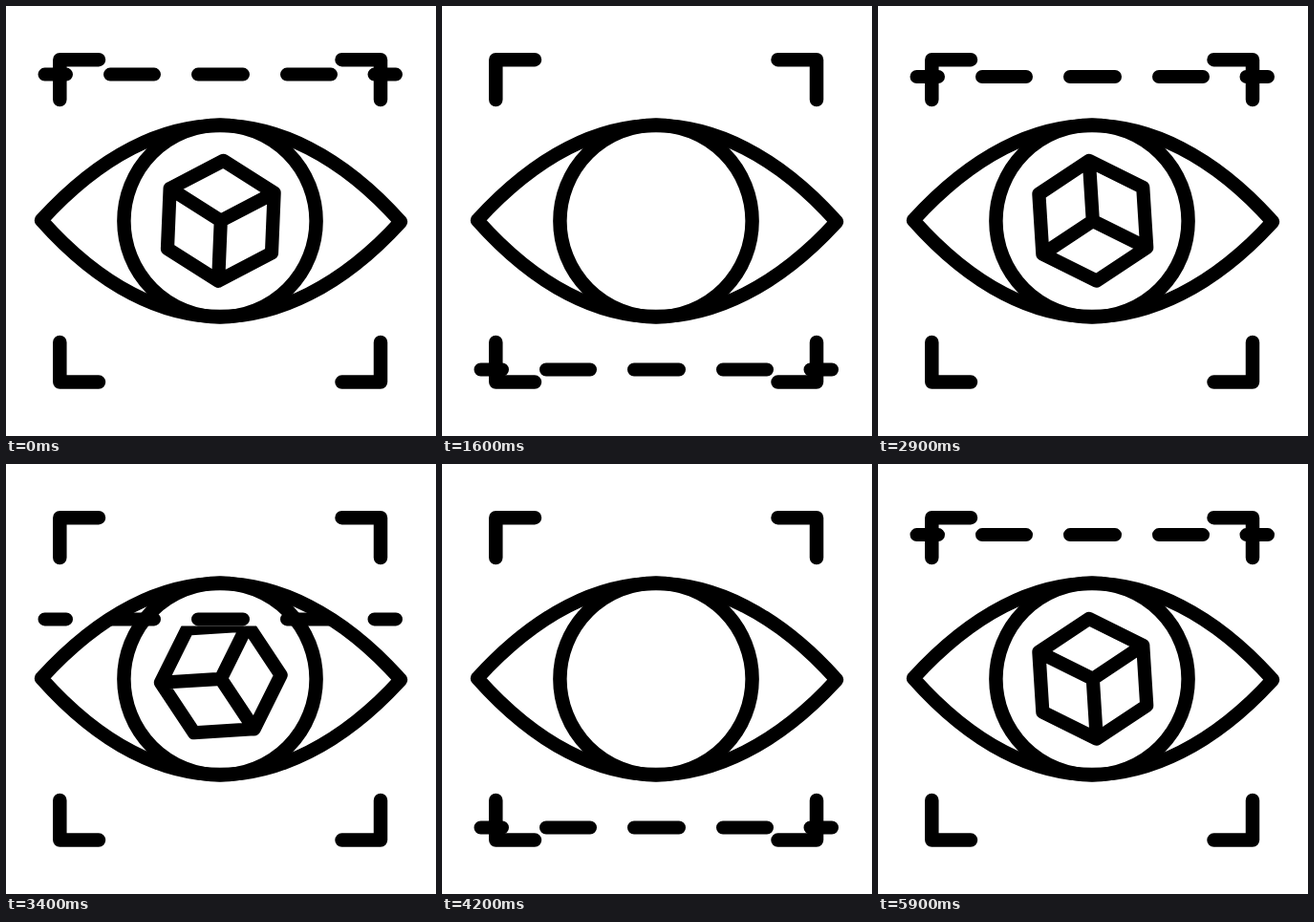
Recreate the animation shown at these times as an HTML page. Size 450x450 px, loop 6000 ms.

```html
<!DOCTYPE html>
<html lang="en">
<head>
<meta charset="utf-8">
<title>Eye scan</title>
<style>
  html, body { margin: 0; width: 100%; height: 100%; overflow: hidden; background: #fff; }
  svg { display: block; width: 100vw; height: 100vh; }
  .ink { fill: none; stroke: #000; stroke-width: 14.5; stroke-linecap: round; stroke-linejoin: round; }
</style>
</head>
<body>
<svg viewBox="0 0 450 450">
  <defs>
    <clipPath id="below"><rect id="window" width="450" height="450"/></clipPath>
  </defs>
  <g class="ink">
    <path d="M97 56.2H56.3V98M351.5 56.2H392V98M56.3 352V393.6H97M392 352V393.6H351.5"/>
    <path d="M37 224.2C100 155 165 125 224 125S350 155 413 225.8C350 295 283 325 224 325S100 295 37 224.2Z"/>
    <circle cx="224" cy="225" r="100.6"/>
    <g clip-path="url(#below)">
      <path id="cube" stroke-width="14.2"/>
    </g>
    <path id="beam" stroke-width="14" d="M40.5 0H63M109 0H155M201 0H248M294 0H340M385.5 0H408"/>
  </g>
</svg>
<script>
  const LOOP = 6000, STEP = 100;
  const TOP = 71, BOTTOM = 380.5;
  const CENTER = 224.8, RADIUS = 63;

  // Beam stops: [time in ms, 0 = top, 1 = bottom]
  const stops = [
    [-30, 0], [1165, 1], [1766, 1], [2970, 0],
    [4165, 1], [4785, 1], [5970, 0], [6000, 0]
  ];

  const cube = document.getElementById('cube');
  const beam = document.getElementById('beam');
  const clip = document.getElementById('window');

  // Hexagon outline plus three inner edges
  const corner = k => {
    const a = k * Math.PI / 3;
    return `${RADIUS * Math.sin(a)} ${-RADIUS * Math.cos(a)}`;
  };
  cube.setAttribute('d',
    'M' + [0, 1, 2, 3, 4, 5].map(corner).join('L') + 'Z' +
    [1, 3, 5].map(k => 'M0 0L' + corner(k)).join(''));

  const ease = x => x * x * (3 - 2 * x);

  function beamY(t) {
    const i = stops.findIndex(s => t < s[0]);
    const [t0, a] = stops[i - 1], [t1, b] = stops[i];
    const p = a + (b - a) * ease((t - t0) / (t1 - t0));
    return TOP + (BOTTOM - TOP) * p;
  }

  function draw() {
    const t = Math.floor(performance.now() % LOOP / STEP) * STEP;
    const y = beamY(t);
    const angle = 2.4 + 360 * t / LOOP;
    beam.setAttribute('transform', `translate(0 ${y})`);
    clip.setAttribute('y', y + 7.2);
    cube.setAttribute('transform', `translate(${CENTER} ${CENTER}) rotate(${angle})`);
    requestAnimationFrame(draw);
  }
  draw();
</script>
</body>
</html>
```
